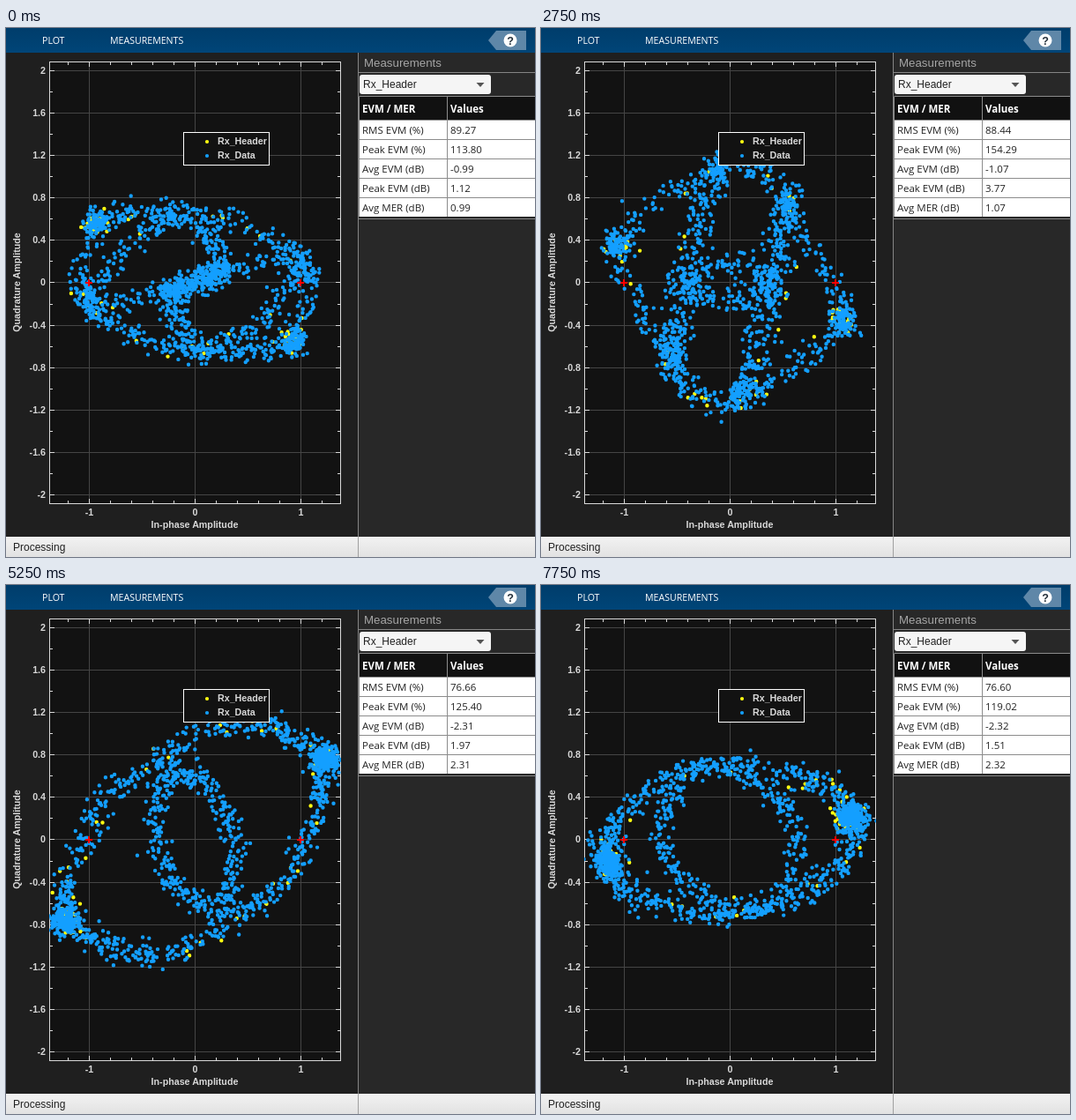
These frames come from a looping animation (600x600 px, 8000 ms). An HTML page:

```html
<!DOCTYPE html>
<html lang="en">
<head>
<meta charset="utf-8">
<title>Constellation</title>
<style>
  html, body { margin: 0; width: 100%; height: 100%; overflow: hidden; background: #1f1f1f; }
  svg { display: block; width: 600px; height: 600px; }
  text { white-space: pre; }
  .ui { font-family: "Open Sans", "Noto Sans", sans-serif; }
  .sans { font-family: "Liberation Sans", Arial, sans-serif; }
  .axis { font: bold 10.7px "Liberation Sans", Arial, sans-serif; fill: #d9d9d9; }
  .dots { fill: none; stroke-width: 4.4; stroke-linecap: round; }
</style>
</head>
<body>
<svg viewBox="0 0 600 600">
  <defs>
    <linearGradient id="bar" x2="0" y2="1"><stop stop-color="#003d6b"/><stop offset="1" stop-color="#004578"/></linearGradient>
    <linearGradient id="foot" x2="0" y2="1"><stop stop-color="#f2f2f2"/><stop offset="1" stop-color="#e2e2e2"/></linearGradient>
    <clipPath id="area"><rect x="49" y="38" width="331" height="502"/></clipPath>
  </defs>

  <rect width="600" height="600" fill="#1f1f1f"/>
  <rect width="600" height="28" fill="url(#bar)"/>
  <g class="ui" font-size="10.6" fill="#fff">
    <text x="41" y="18">PLOT</text>
    <text x="118" y="18">MEASUREMENTS</text>
  </g>
  <path d="M547 14L556 3H590V25H556Z" fill="#5f87a8"/>
  <circle cx="572" cy="14" r="7.5" fill="#fff"/>
  <text class="sans" x="572" y="18.500" font-size="12.5" font-weight="bold" text-anchor="middle" fill="#25313b">?</text>

  <rect x="49" y="38" width="331" height="502" fill="#121212"/>
  <g id="grid" shape-rendering="crispEdges"></g>
  <g id="labels" class="axis"></g>
  <text class="axis" x="214" y="567" text-anchor="middle">In-phase Amplitude</text>
  <text class="axis" transform="translate(16 288.5) rotate(-90)" text-anchor="middle">Quadrature Amplitude</text>

  <g clip-path="url(#area)">
    <path id="header" class="dots" stroke="#ffff11"/>
    <path id="data" class="dots" stroke="#139fff"/>
  </g>
  <path d="M90 289h8M94 285v8M330 289h8M334 285v8" stroke="#f00" stroke-width="2"/>
  <rect x="201.5" y="118.5" width="97" height="37" fill="#121212" stroke="#fff"/>
  <circle cx="228" cy="129" r="2.1" fill="#ffff11"/>
  <circle cx="228" cy="145" r="2.1" fill="#139fff"/>
  <text class="axis" x="240" y="132">Rx_Header</text>
  <text class="axis" x="240" y="148">Rx_Data</text>

  <rect x="399" y="28" width="201" height="549" fill="#282828"/>
  <path d="M399.5 28V577M400 50.5H600M400 216.5H600" stroke="#858585"/>
  <text class="sans" x="406" y="44" font-size="13.3" fill="#a6a6a6">Measurements</text>
  <rect x="401" y="53" width="149" height="22" rx="3" fill="#f5f5f5"/>
  <text class="sans" x="405" y="68" font-size="12" fill="#222">Rx_Header</text>
  <path d="M533.5 62h9l-4.500 5z" fill="#555"/>
  <rect x="401" y="78" width="199" height="27" fill="#111"/>
  <rect x="401" y="105" width="199" height="109" fill="#fff"/>
  <g id="table" class="ui" font-size="11.5" fill="#222"></g>

  <rect y="577" width="600" height="23" fill="url(#foot)"/>
  <path d="M399.5 577V600" stroke="#a0a0a0"/>
  <text class="sans" x="8" y="593" font-size="12" fill="#222">Processing</text>
</svg>
<script>
const STEP = 250, STEPS = 32, DATA = 1500, HEADER = 72, NOISE = .055;
const $ = id => document.getElementById(id);
const px = x => 214.3 + 120 * x;
const py = y => 288.49 - 120.25 * y;
const mix = (a, b, k) => a + (b - a) * k;

function add(parent, tag, attrs, text = '') {
  const el = document.createElementNS('http://www.w3.org/2000/svg', tag);
  for (const name in attrs) el.setAttribute(name, attrs[name]);
  el.textContent = text;
  return parent.appendChild(el);
}

// Axes: grid lines, ticks on all four sides, labels.
function drawAxes() {
  let grid = '', ticks = '';
  for (let i = -10; i <= 10; i++) {
    const y = Math.round(py(i / 5)) + .5, major = i % 2 === 0, len = major ? 5 : 3;
    ticks += `M50 ${y}h${len}M379 ${y}h${-len}`;
    if (!major) continue;
    grid += `M50 ${y}H379`;
    add($('labels'), 'text', { x: 45, y: y + 3.5, 'text-anchor': 'end' }, String(i / 5));
  }
  for (let i = -6; i <= 6; i++) {
    const x = Math.round(px(i / 5)) + .5, major = i % 5 === 0, len = major ? 5 : 3;
    ticks += `M${x} 539v${-len}M${x} 39v${len}`;
    if (!major) continue;
    grid += `M${x} 39V539`;
    add($('labels'), 'text', { x, y: 553, 'text-anchor': 'middle' }, String(i / 5));
  }
  add($('grid'), 'path', { d: grid, stroke: '#454545' });
  add($('grid'), 'path', { d: ticks, stroke: '#d9d9d9' });
  add($('grid'), 'rect', { x: 49.5, y: 38.5, width: 330, height: 501, fill: 'none', stroke: '#d9d9d9' });
}

function drawTable() {
  const head = { y: 96, fill: '#fff', 'font-weight': 'bold' };
  add($('table'), 'text', { x: 404, ...head }, 'EVM / MER');
  add($('table'), 'text', { x: 504, ...head }, 'Values');
  const names = ['RMS EVM (%)', 'Peak EVM (%)', 'Avg EVM (dB)', 'Peak EVM (dB)', 'Avg MER (dB)'];
  let lines = 'M400.5 77.500H600M400.5 78V214M500.5 78V214';
  const cells = names.map((name, i) => {
    const y = 120 + 22 * i;
    lines += `M401 ${y - 15.5}H600`;
    add($('table'), 'text', { x: 404, y }, name);
    return add($('table'), 'text', { x: 504, y });
  });
  add($('table'), 'path', { d: lines, stroke: '#8c8c8c' });
  return cells;
}

// Channel keys: tap gap in symbols, then the received points for bits +++, -++ and ++-.
const keys = [
  { t: 0, rms: 89.27, peak: 113.80, gap: 1, pts: [-.93, .55, -1, -.2, -.15, .65] },
  { t: 1750, rms: 98.90, peak: 141.31, gap: 1, pts: [0, .97, -.5, .68, .45, .1] },
  { t: 2750, rms: 88.44, peak: 154.29, gap: .96, pts: [1.05, -.36, .55, .73, .1, -1.08] },
  { t: 3750, rms: 81.52, peak: 127.70, gap: 1, pts: [1.27, .28, .45, 1.22, .3, -.8] },
  { t: 5250, rms: 76.66, peak: 125.40, gap: .7, pts: [1.2, .74, .3, 1.1, .9, -.3] },
  { t: 6000, rms: 63.81, peak: 100.86, gap: .8, pts: [1, .56, .15, .7, .85, -.45] },
  { t: 7750, rms: 76.60, peak: 119.02, gap: .52, pts: [1.1, .2, .5, .7, .75, -.65] }
];

function channel(t) {
  const i = Math.max(1, keys.findIndex(key => key.t >= t)), a = keys[i - 1], b = keys[i];
  const k = (t - a.t) / (b.t - a.t), at = name => mix(a[name], b[name], k);
  const [x1, y1, x2, y2, x3, y3] = a.pts.map((v, j) => mix(v, b.pts[j], k));
  const taps = [[x1 - x2, y1 - y2], [x2 + x3, y2 + y3], [x1 - x3, y1 - y3]];
  return { taps, rms: at('rms'), peak: at('peak'), gap: at('gap') };
}

function random(seed) {
  return () => {
    seed = seed + 0x6D2B79F5 | 0;
    let r = Math.imul(seed ^ seed >>> 15, 1 | seed);
    r = r + Math.imul(r ^ r >>> 7, 61 | r) ^ r;
    return ((r ^ r >>> 14) >>> 0) / 4294967296;
  };
}

// Smooth waveform through the bits (+1 / -1).
function wave(bits, t) {
  const i = Math.floor(t), k = t - i;
  const [a, b, c, d] = [-1, 0, 1, 2].map(j => bits[(i + j + bits.length) % bits.length]);
  return b + k / 2 * (c - a + k * (2 * a - 5 * b + 4 * c - d + k * (3 * (b - c) + d - a)));
}

// Samples of the bit waveform after a three-tap channel with noise.
function receive(bits, { taps, gap }, count, rnd) {
  let d = '';
  for (let n = 0; n < count; n++) {
    const t = bits.length * rnd(), sign = rnd() < .5 ? -1 : 1;
    const r = NOISE * Math.sqrt(-2 * Math.log(1 - rnd())), a = 2 * Math.PI * rnd();
    let x = r * Math.cos(a), y = r * Math.sin(a);
    taps.forEach(([re, im], i) => {
      const s = sign * wave(bits, t - i * gap) / 2;
      x += re * s;
      y += im * s;
    });
    d += `M${px(x).toFixed(1)} ${py(y).toFixed(1)}h0`;
  }
  return d;
}

// The header repeats every bit of a Barker code twice.
const headerBits = [...'+++++--++-+-+'].flatMap(c => c === '+' ? [1, 1] : [-1, -1]);

drawAxes();
const cells = drawTable();

function show(step) {
  const ch = channel(step * STEP), rnd = random(step * 977 + 5);
  const bits = Array.from({ length: 500 }, () => rnd() < .5 ? -1 : 1);
  $('header').setAttribute('d', receive(headerBits, ch, HEADER, rnd));
  $('data').setAttribute('d', receive(bits, ch, DATA, rnd));
  const db = v => 20 * Math.log10(v / 100);
  [ch.rms, ch.peak, db(ch.rms), db(ch.peak), -db(ch.rms)].forEach((v, i) => cells[i].textContent = v.toFixed(2));
}

let shown = -1;
const start = performance.now();
function tick() {
  const step = Math.floor(Math.max(0, performance.now() - start) / STEP) % STEPS;
  if (step !== shown) show(shown = step);
  requestAnimationFrame(tick);
}
tick();
</script>
</body>
</html>
```
